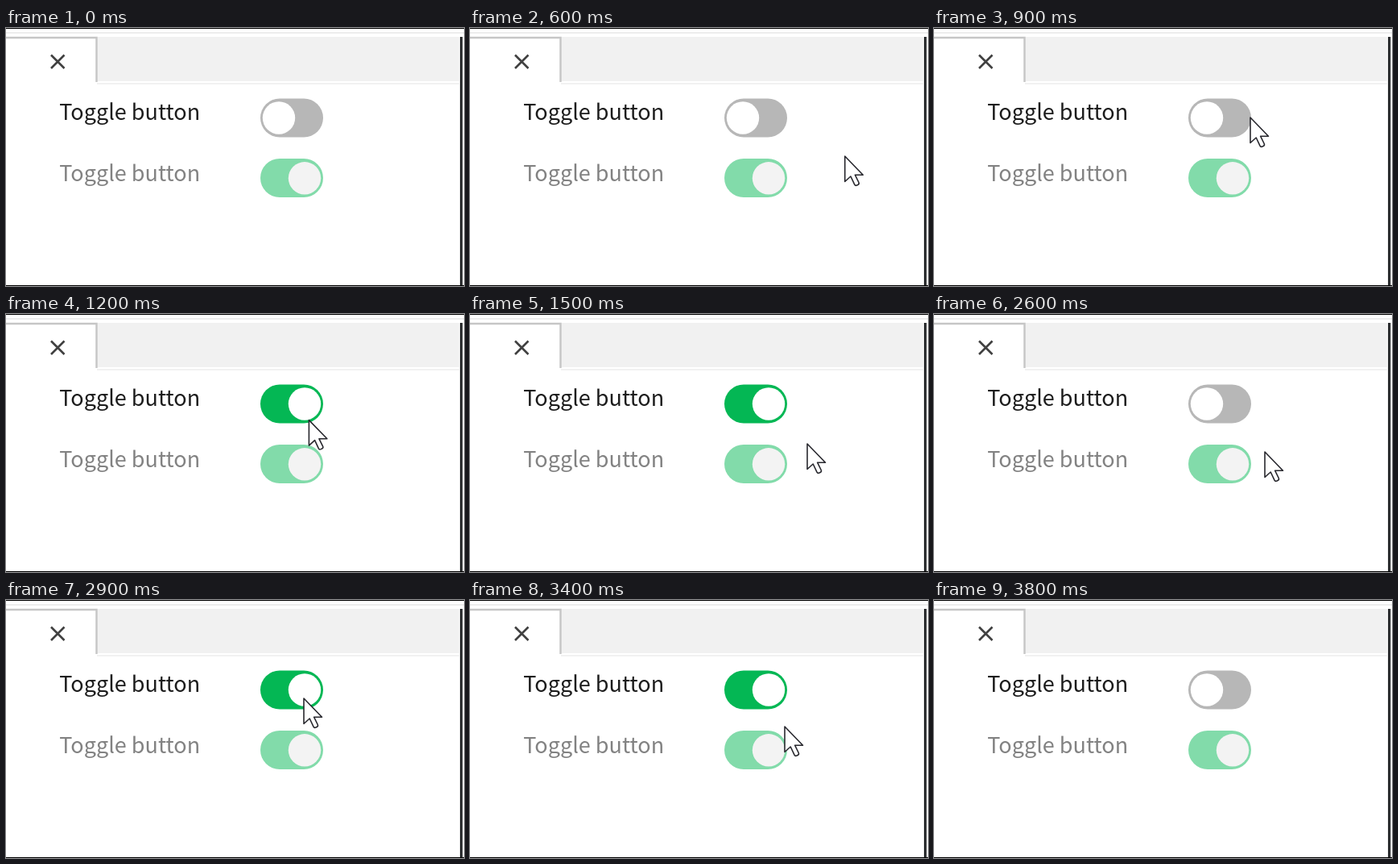
These frames come from a looping animation (569 px wide and 320 px high, 5.2 s). An HTML page:

```html
<!DOCTYPE html>
<html lang="en">
<head>
<meta charset="utf-8">
<title>Toggle button</title>
<style>
  html, body { margin: 0; width: 100%; height: 100%; overflow: hidden; background: #fff; }
  svg { display: block; width: 100%; height: 100%; }
  text { font: 27px "Noto Sans CJK JP", "Noto Sans CJK SC", "Noto Sans CJK", "Open Sans", sans-serif; }
  .soft { filter: blur(.5px); }
</style>
</head>
<body>
<svg viewBox="0 0 569 320">
  <defs>
    <g id="toggle">
      <rect width="78" height="48" rx="24"/>
      <circle class="knob" cx="55" cy="24" r="20.2"/>
    </g>
  </defs>
  <rect width="569" height="320" fill="#fff"/>
  <g class="soft">
    <!-- tab bar -->
    <rect y="5" width="569" height="2" fill="#ededed"/>
    <rect x="113" y="11" width="450" height="55" fill="#f1f1f1"/>
    <rect x="113" y="68" width="450" height="2" fill="#f1f1f1"/>
    <path d="M0 12H112.5V67" fill="none" stroke="#c6c6c6" stroke-width="2.4"/>
    <rect x="564" y="11" width="3.3" height="309" fill="#2c2e30"/>
    <path d="M56 33.5 72.5 50M72.5 33.5 56 50" stroke="#404040" stroke-width="2.6"/>

    <text x="66.2" y="114" fill="#1c1c1c">Toggle button</text>
    <text x="66.2" y="190" fill="#828282">Toggle button</text>

    <g transform="translate(316 87.5)">
      <rect id="track" width="78" height="48" rx="24"/>
      <circle id="knob" cy="24" r="20.2" fill="#fff"/>
    </g>
    <g transform="translate(316 162)">
      <rect width="78" height="48" rx="24" fill="#82dbaa"/>
      <circle cx="55" cy="24.3" r="20.2" fill="#f3f3f3"/>
    </g>

    <path id="cursor" d="M0 0V31.5L7.2 25 12 35.2Q13 37 15 36L16.5 35.2Q18 34.3 17.2 32.5L12.6 23.2H22.5Z"
          fill="#fff" stroke="#28282e" stroke-width="1.6" stroke-linejoin="round"/>
  </g>
  <path d="M0 .5H569M0 319.5H569" stroke="#000"/>
</svg>
<script>
  const LOOP = 5200, STEP = 100, SHOW = 500, HIDE = 3800;
  const clicks = [1100, 2100, 2900, 3600];
  // pointer stops: arrival time, x, y, rest time
  const stops = [
    [500, 490, 175], [900, 393, 111], [1000, 348, 112], [1500, 419, 161],
    [1600, 445, 191], [2000, 369, 115, 200], [2500, 483, 284], [2600, 411, 171],
    [2800, 370, 122, 200], [3400, 391, 157], [3600, 370, 122]
  ];
  const [track, knob, cursor] = ["track", "knob", "cursor"].map(id => document.getElementById(id));

  function tip(t) {
    const next = stops.findIndex(s => s[0] > t);
    if (next < 0) return stops.at(-1).slice(1, 3);
    const [t0, x0, y0, rest = 0] = stops[next - 1], [t1, x1, y1] = stops[next];
    const k = Math.max(0, (t - t0 - rest) / (t1 - t0 - rest));
    return [x0 + (x1 - x0) * k, y0 + (y1 - y0) * k];
  }

  function draw(now) {
    const t = Math.floor(now % LOOP / STEP) * STEP;
    const on = clicks.filter(c => c <= t).length % 2;
    track.setAttribute("fill", on ? "#04b754" : "#b7b7b7");
    knob.setAttribute("cx", on ? 55 : 23);
    const visible = t >= SHOW && t < HIDE;
    cursor.style.display = visible ? "" : "none";
    if (visible) cursor.setAttribute("transform", `translate(${tip(t)})`);
  }

  const start = performance.now();
  function frame() {
    draw(performance.now() - start);
    requestAnimationFrame(frame);
  }
  frame();
</script>
</body>
</html>
```
